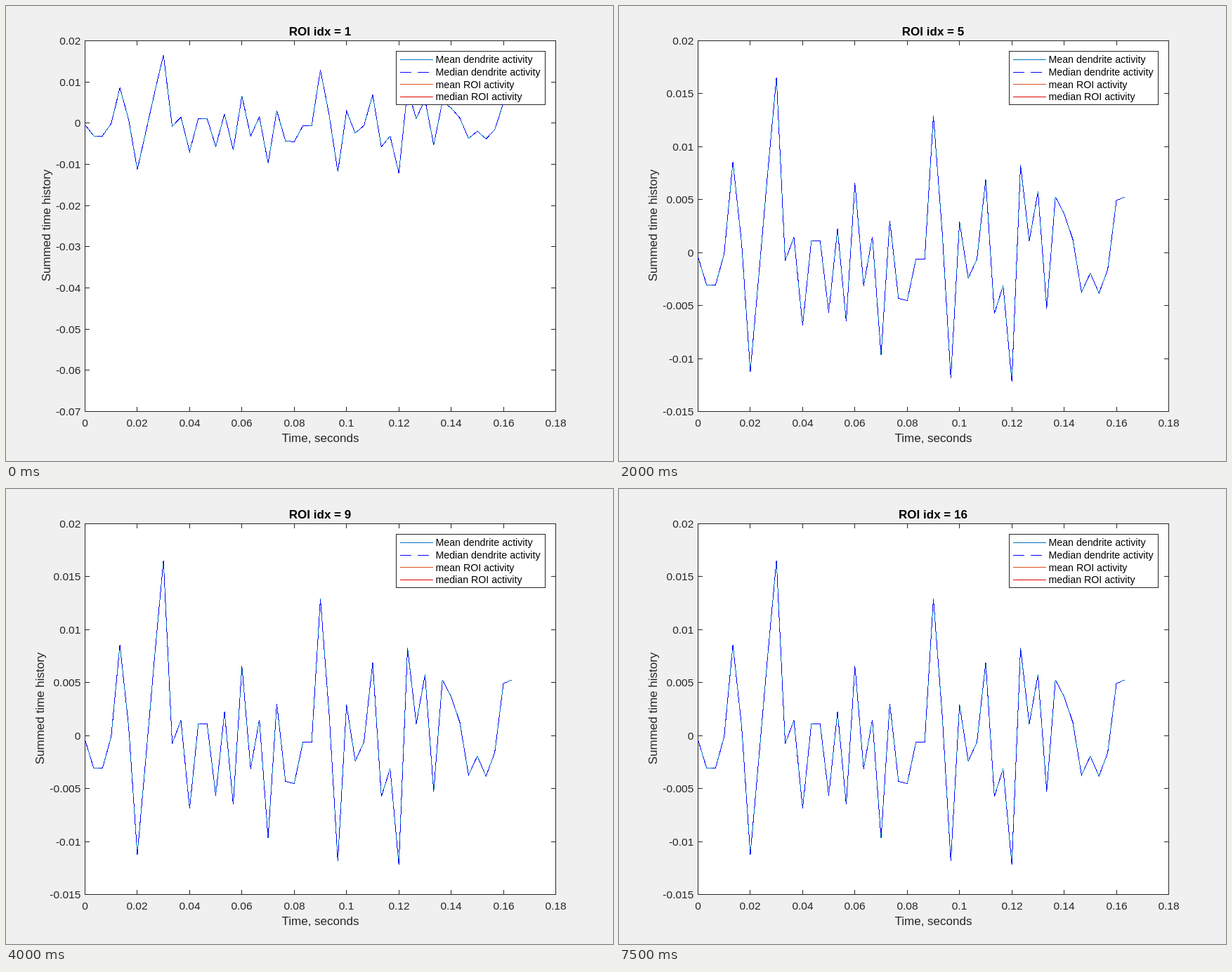
An HTML page for the animation above (8000 ms loop, 864x648 px).

```html
<!DOCTYPE html>
<html lang="en">
<head>
<meta charset="utf-8">
<title>ROI activity</title>
<style>
  html, body { margin: 0; width: 100%; height: 100%; overflow: hidden; background: #f0f0f0; }
  svg { display: block; width: 864px; height: 648px; }
  path, rect { shape-rendering: crispEdges; }
  text { font: 15.5px "Liberation Sans", Arial, sans-serif; fill: #262626; }
  .label { font-size: 17px; }
  .title { font-size: 17px; font-weight: bold; fill: #000; }
  .key { font-size: 14.2px; fill: #000; }
</style>
</head>
<body>
<svg id="stage" viewBox="0 0 864 648"></svg>
<script>
const LEFT = 112.5, RIGHT = 782.5, TOP = 49.5, BOTTOM = 577.5;
const TICK = 6.5, STEP_MS = 500, STEPS = 16;
const AXIS = '#262626', MEAN = '#0072bd', MEDIAN = '#0000ff', DASH = '15.5 9.5';

// Samples in units of 1e-5, taken every 1/300 s
const samples = [
  -40, -310, -310, -10, 856, 90, -1123, -190, 760, 1655,
  -78, 144, -688, 111, 113, -565, 224, -648, 655, -313,
  150, -967, 302, -433, -453, -62, -64, 1291, 210, -1185,
  290, -241, -60, 688, -575, -313, -1215, 827, 111, 575,
  -526, 525, 369, 124, -373, -194, -383, -161, 492, 527
];

const legend = [
  ['Mean dendrite activity', MEAN],
  ['Median dendrite activity', MEDIAN, DASH],
  ['mean ROI activity', '#d95319'],
  ['median ROI activity', '#e00000']
];

// Vertical limits and tick spacing, in thousandths
function limits(idx) {
  if (idx < 3) return [-70, 20, 10];
  if (idx === 3) return [-50, 20, 10];
  if (idx === 4) return [-40, 20, 10];
  return [-15, idx === 8 ? 25 : 20, 5];
}

const path = (d, color = AXIS, dash = 'none') =>
  `<path d="${d}" fill="none" stroke="${color}" stroke-dasharray="${dash}"/>`;
const box = (x, y, w, h) =>
  `<rect x="${x}" y="${y}" width="${w}" height="${h}" fill="#fff" stroke="${AXIS}"/>`;
const text = (x, y, s, anchor = 'middle', cls = '', extra = '') =>
  `<text x="${x}" y="${y}" text-anchor="${anchor}" class="${cls}" ${extra}>${s}</text>`;
const crisp = v => Math.floor(v) + 0.5;

function chart(idx) {
  const [low, high, step] = limits(idx);
  const xAt = t => LEFT + (RIGHT - LEFT) * t / 0.18;
  const yAt = v => BOTTOM - (BOTTOM - TOP) * (v - low) / (high - low);
  let ticks = '', labels = '';

  for (let i = 0; i <= 9; i++) {
    const x = crisp(xAt(i * 0.02));
    ticks += `M${x} ${BOTTOM}v${-TICK}M${x} ${TOP}v${TICK}`;
    labels += text(x, 598.5, +(i * 0.02).toFixed(2));
  }
  for (let v = low; v <= high; v += step) {
    const y = crisp(yAt(v));
    ticks += `M${LEFT} ${y}h${TICK}M${RIGHT} ${y}h${-TICK}`;
    labels += text(106.3, y + 5.5, +(v / 1000).toFixed(3), 'end');
  }

  const line = 'M' + samples.map((s, i) =>
    `${xAt(i / 300).toFixed(2)} ${yAt(s / 100).toFixed(2)}`).join('L');
  const labelX = step === 5 ? 53.5 : 62.5;

  return box(LEFT, TOP, RIGHT - LEFT, BOTTOM - TOP)
    + path(ticks) + labels
    + path(line, MEAN) + path(line, MEDIAN, DASH)
    + text(447, 42, 'ROI idx = ' + idx, 'middle', 'title')
    + text(447.5, 620.5, 'Time, seconds', 'middle', 'label')
    + text(0, 0, 'Summed time history', 'middle', 'label',
        `transform="translate(${labelX} 312.5) rotate(-90)"`)
    + box(555.5, 64.5, 212, 76)
    + legend.map(([name, color, dash], i) => {
        const y = 76.3 + i * 17.7;
        return path(`M561 ${crisp(y)}H607.5`, color, dash)
          + text(611.5, y + 5, name, 'start', 'key');
      }).join('');
}

const stage = document.getElementById('stage');
const start = performance.now();
let shown = 0;

function tick() {
  const elapsed = Math.max(0, performance.now() - start);
  const idx = Math.floor(elapsed / STEP_MS) % STEPS + 1;
  if (idx !== shown) stage.innerHTML = chart(shown = idx);
  requestAnimationFrame(tick);
}
tick();
</script>
</body>
</html>
```
